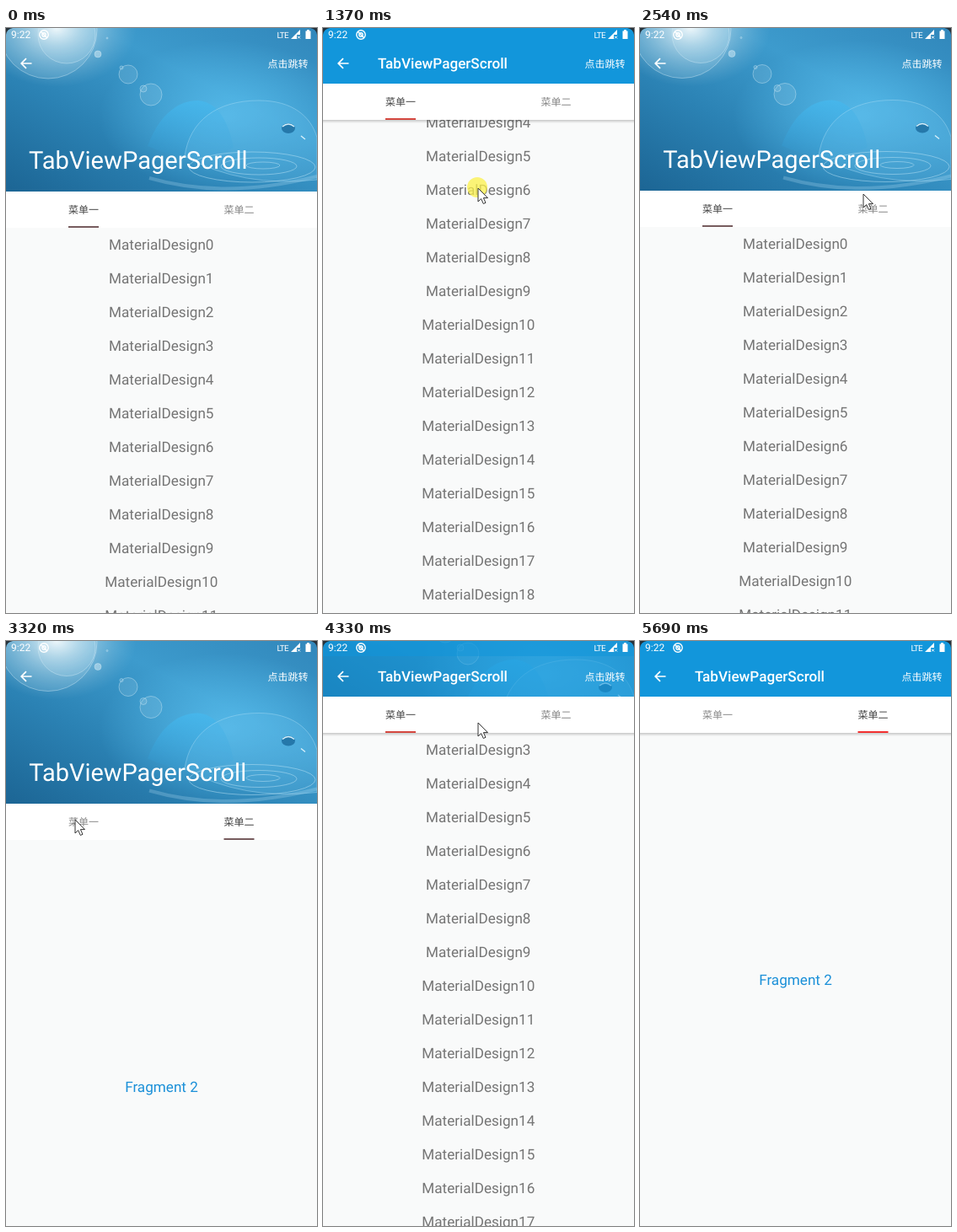
An HTML page that plays this animation: 369 by 694 pixels, repeating every 6010 ms.

```html
<!DOCTYPE html>
<html lang="zh">
<head>
<meta charset="utf-8">
<style>
  html, body { margin: 0; width: 100%; height: 100%; overflow: hidden; background: #f9fafa; }
  svg { display: block; font-family: Roboto, sans-serif; }
  text { text-rendering: geometricPrecision; }
  .cjk { font: 12px "Noto Sans CJK SC", "Noto Sans CJK", sans-serif; }
  .item { font-size: 17.14px; fill: #757575; text-anchor: middle; }
</style>
</head>
<body>
<svg width="369" height="694" viewBox="0 0 369 694">
  <defs>
    <linearGradient id="water" x1="0" y1="1" x2="1" y2="0">
      <stop offset="0" stop-color="#1c6594"/>
      <stop offset=".35" stop-color="#2b82b4"/>
      <stop offset=".65" stop-color="#3d9bcd"/>
      <stop offset="1" stop-color="#3187bb"/>
    </linearGradient>
    <radialGradient id="flare">
      <stop offset="0" stop-color="#fff" stop-opacity=".95"/>
      <stop offset=".3" stop-color="#e4f1f6" stop-opacity=".6"/>
      <stop offset="1" stop-color="#8fc3dd" stop-opacity="0"/>
    </radialGradient>
    <radialGradient id="glow">
      <stop offset="0" stop-color="#5cc3f2" stop-opacity=".75"/>
      <stop offset="1" stop-color="#5cc3f2" stop-opacity="0"/>
    </radialGradient>
    <linearGradient id="dome" x1="0" y1="0" x2="0" y2="1">
      <stop offset="0" stop-color="#45b9ef" stop-opacity=".75"/>
      <stop offset="1" stop-color="#2f9bd5" stop-opacity=".15"/>
    </linearGradient>
    <linearGradient id="shade" x1="0" y1="0" x2="0" y2="1">
      <stop offset="0" stop-opacity=".2"/>
      <stop offset="1" stop-opacity="0"/>
    </linearGradient>
    <clipPath id="headerClip"><rect id="headerBox" width="369" height="194"/></clipPath>
  </defs>

  <rect width="369" height="694" fill="#f9fafa"/>
  <g id="list"></g>
  <text id="fragment" class="item" x="184.5" style="fill:#1b90d8">Fragment 2</text>

  <g clip-path="url(#headerClip)">
    <g id="photo">
      <rect width="369" height="194" fill="url(#water)"/>
      <ellipse cx="260" cy="105" rx="150" ry="90" fill="url(#glow)"/>
      <ellipse cx="60" cy="0" rx="95" ry="70" fill="url(#flare)"/>
      <g fill="#d8eef8" fill-opacity=".13" stroke="#d8eef8" stroke-opacity=".4">
        <circle cx="72" cy="8" r="34"/>
        <circle cx="50" cy="2" r="58"/>
        <circle cx="145" cy="55" r="11"/>
        <circle cx="172" cy="79" r="13"/>
        <circle cx="163" cy="72" r="4"/>
        <circle cx="109" cy="31" r="4" fill-opacity=".5"/>
        <circle cx="120" cy="12" r="1"/>
        <circle cx="137" cy="47" r="2"/>
      </g>
      <path d="M168 140C180 108 200 86 228 86C252 88 264 112 270 142Q220 165 168 140Z" fill="url(#dome)"/>
      <path d="M212 152C218 110 250 86 300 86C340 86 362 105 369 130V180Q280 190 212 152Z" fill="#66bce6" fill-opacity=".25" stroke="#a8dbf3" stroke-opacity=".45"/>
      <g fill="none" stroke="#bce3f5" stroke-opacity=".5">
        <ellipse cx="292" cy="165" rx="75" ry="18"/>
        <ellipse cx="300" cy="164" rx="45" ry="10"/>
        <ellipse cx="305" cy="163" rx="20" ry="4"/>
        <path d="M170 178Q260 204 369 176" stroke-width="4" stroke-opacity=".25"/>
      </g>
      <ellipse cx="335" cy="119" rx="8" ry="6" fill="#2578aa"/>
      <path d="M328 117q7-6 14 0M350 128l5 4" fill="none" stroke="#d5effa" stroke-width="1.5"/>
    </g>
    <rect class="scrim" width="369" height="194" fill="#1296db"/>
    <rect class="scrim" width="369" height="18" fill="#1296db"/>
  </g>

  <g id="tabs">
    <rect id="shadow" y="237" width="369" height="4" fill="url(#shade)"/>
    <rect y="194" width="369" height="43" fill="#fff"/>
    <text class="cjk tab" x="74" y="220">菜单一</text>
    <text class="cjk tab" x="258.5" y="220">菜单二</text>
    <rect id="indicator" y="235" width="36" height="2"/>
  </g>

  <g fill="#fff">
    <text x="6" y="12.3" font-size="12">9:22</text>
    <g fill="none" stroke="#fff" stroke-width="1.4">
      <circle cx="45" cy="8" r="5.2"/>
      <circle cx="45" cy="8" r="2.2"/>
      <path d="M41.5 4.5l7 7"/>
      <path d="M30.5 42H18.5M24 36.2L18.2 42L24 47.8" stroke-width="1.7"/>
    </g>
    <text x="321.5" y="12" font-size="10" letter-spacing="-.7">LTE</text>
    <path d="M338 13L349 2V8H345V13Z"/>
    <path d="M346 9.5l3 3m0-3l-3 3" stroke="#fff"/>
    <path d="M355.5 3.5h1.7V2h2.6v1.5h1.7V13h-6z"/>
    <text class="cjk" x="310.5" y="46.5">点击跳转</text>
    <text id="title">TabViewPagerScroll</text>
  </g>
  <path d="M0 0H8Q1 1 0 8ZM369 0H361Q368 1 369 8Z" fill="#25313a"/>

  <g id="cursor">
    <circle id="touch" cx="-1" cy="-1" r="12" fill="#fbf04a" fill-opacity=".75"/>
    <path d="M0 0V16L3.7 12.6L6.3 18.5L9 17.3L6.4 11.6H11.5Z" fill="#fff" stroke="#333"/>
  </g>
</svg>
<script>
const LOOP = 6010, STEP = 76.9, LAST = 74, RANGE = 128;
const $ = id => document.getElementById(id);
const tabs = document.querySelectorAll('.tab');
const scrims = document.querySelectorAll('.scrim');

// Key tables: [step, value...]
const scrollKeys = [[0, 0], [3, 0], [5, 70], [7, 165], [10, 287], [13, 345], [17, 345], [19, 265],
  [22, 95], [23, 0], [30, 0], [32, 1], [49, 1], [50, 2], [51, 30], [53, 130], [55, 235], [56, 248]];
const scrimKeys = [[0, 0], [6, 0], [10, .52], [13.8, 1], [22.7, 1], [26, .45], [30.5, 0],
  [52, 0], [56, .55], [60, 1]];
const cursorKeys = [[1, 230, 700], [3, 195, 537], [5, 195, 467], [7, 194, 372], [10, 194, 250],
  [13, 192, 192], [16, 185, 150], [17, 184, 150], [19, 183, 230], [22, 182, 400], [23, 182, 498],
  [25, 183, 498], [29, 225, 330], [32, 265, 197], [35, 265, 197], [38, 220, 212], [42, 82, 212],
  [45, 82, 212], [49, 178, 333], [50, 178, 331], [51, 179, 303], [53, 181, 203], [55, 183, 109],
  [56, 184, 97], [58, 184, 97], [61, 246, 77], [63, 246, 77], [65, 250, 107], [69, 285, 360], [73, 343, 690]];
const touches = [[3, 13], [17, 24], [34, 34], [44, 44], [49, 55], [62, 62]];
const tabKeys = [[0, 0], [34, 0], [38, 1], [44, 1], [48, 0], [62, 0], [65.5, 1]];

for (let i = 0; i < 30; i++) {
  const item = document.createElementNS('http://www.w3.org/2000/svg', 'text');
  item.setAttribute('class', 'item');
  item.setAttribute('x', 184.3);
  item.setAttribute('y', 263 + 40 * i);
  item.textContent = 'MaterialDesign' + i;
  $('list').append(item);
}

const mix = (a, b, p) => a + (b - a) * p;
const smooth = p => p * p * (3 - 2 * p);

function sample(keys, k) {
  const next = keys.findIndex(key => key[0] > k);
  if (next < 0) return keys.at(-1).slice(1);
  if (next === 0) return keys[0].slice(1);
  const a = keys[next - 1], b = keys[next], p = (k - a[0]) / (b[0] - a[0]);
  return a.slice(1).map((v, i) => mix(v, b[i + 1], p));
}

function set(el, attrs) {
  for (const name in attrs) el.setAttribute(name, attrs[name]);
}
const move = (el, x, y) => set(el, { transform: `translate(${x} ${y})` });

function draw(time) {
  const k = Math.min(LAST, Math.floor(time / STEP + .2));
  const scroll = Math.round(sample(scrollKeys, k)[0]);
  const lift = Math.min(scroll, RANGE), p = lift / RANGE;
  const second = (k >= 35 && k < 45) || k >= 63;

  move($('list'), 0, -scroll);
  $('list').style.display = second ? 'none' : '';
  set($('fragment'), { y: 536 - lift });
  $('fragment').style.display = second ? '' : 'none';

  set($('headerBox'), { height: 194 - lift });
  move($('photo'), 0, -lift / 2);
  const alpha = sample(scrimKeys, k)[0];
  scrims.forEach(el => set(el, { opacity: alpha }));

  move($('tabs'), 0, -lift);
  tabs.forEach((el, i) => set(el, { fill: second === (i === 1) ? '#444' : '#888' }));
  set($('shadow'), { opacity: p === 1 ? 1 : 0 });
  set($('indicator'), {
    x: mix(74, 258.5, smooth(sample(tabKeys, k)[0])),
    fill: p < 1 ? '#775c5e' : second ? '#f23030' : '#d4473f'
  });

  const shrink = 1 - (1 - p) ** 2;
  set($('title'), {
    x: mix(27, 65, p), y: mix(167, 48, p),
    'font-size': mix(29.14, 17.14, shrink), 'font-weight': p === 1 ? 500 : 400
  });

  const [x, y] = sample(cursorKeys, k).map(Math.round);
  move($('cursor'), x, y);
  $('cursor').style.display = k > 0 && k < LAST ? '' : 'none';
  $('touch').style.display = touches.some(([a, b]) => k >= a && k <= b) ? '' : 'none';
}

const start = performance.now();
function tick() {
  draw((performance.now() - start) % LOOP);
  requestAnimationFrame(tick);
}
tick();
</script>
</body>
</html>
```
